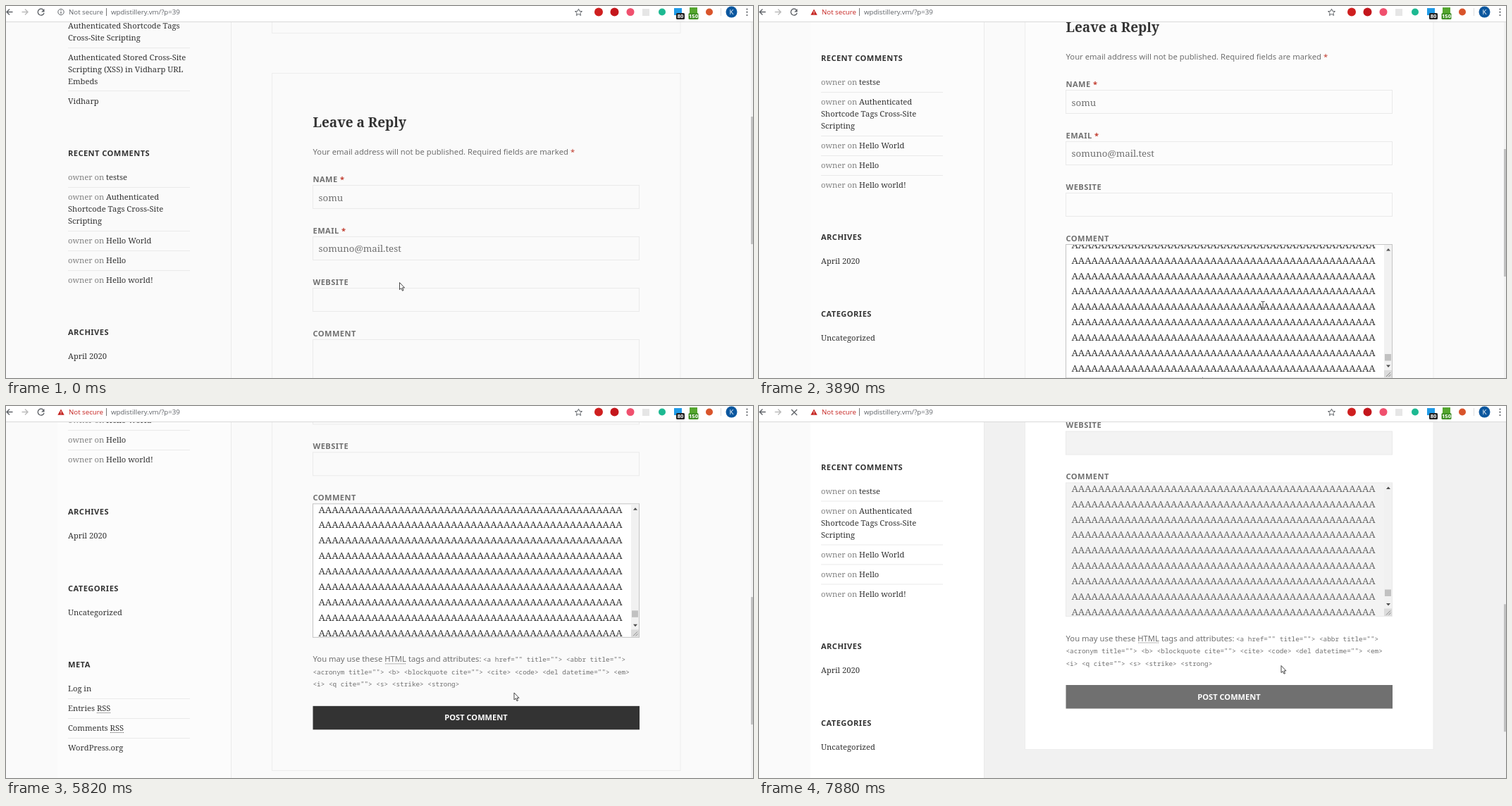
An HTML page that plays this animation: 1060 px wide and 528 px high, repeating every 8 s.

```html
<!DOCTYPE html>
<html lang="en">
<head>
<meta charset="utf-8">
<title>Comment form</title>
<style>
html, body { margin: 0; width: 100%; height: 100%; overflow: hidden; background: #fafafa; }
svg { display: block; }
text { white-space: pre; }
.serif { font: 11.2px "Noto Serif", serif; fill: #333; }
.head { font: bold 11.1px "Noto Sans", sans-serif; letter-spacing: .04em; fill: #333; }
.label { font: bold 11.1px "Noto Sans", sans-serif; letter-spacing: .04em; fill: #707070; }
.note { font: 11.27px "Noto Sans", sans-serif; fill: #707070; }
.title { font: bold 19px "Noto Serif", serif; fill: #333; }
.input { font: 13.3px "Noto Serif", serif; fill: #707070; }
.code { font: 9.37px "Noto Sans Mono", monospace; fill: #707070; }
.bar { font: 9.7px "Open Sans", sans-serif; fill: #5f6368; }
.badge { font: bold 7.5px "Open Sans", sans-serif; fill: #fff; text-anchor: middle; }
.dim { fill: #808080; }
.req { fill: #c0392b; }
.line { stroke: #eaeaea; fill: none; }
.box { stroke: #eaeaea; }
.card { stroke: #ededed; }
</style>
</head>
<body>
<svg id="stage" width="1060" height="528" viewBox="0 0 1060 528"></svg>
<script>
const ROW = 21.9, LOOP = 8000;
const text = (x, y, cls, s, more = '') => `<text x="${x}" y="${y}" class="${cls}" ${more}>${s}</text>`;
const rect = (x, y, w, h, more = '') => `<rect x="${x}" y="${y}" width="${w}" height="${h}" ${more}/>`;
const disc = (x, y, r, fill) => `<circle cx="${x}" cy="${y}" r="${r}" fill="${fill}"/>`;
const path = (d, more = '') => `<path d="${d}" ${more}/>`;
const esc = s => s.replace(/</g, '&lt;').replace(/>/g, '&gt;');
const req = ' <tspan class="req">*</tspan>';

function sidebar() {
  const by = '<tspan class="dim">owner on</tspan> ';
  const lines = [
    [32, 'Authenticated Shortcode Tags'], [49, 'Cross-Site Scripting'],
    [77, 'Authenticated Stored Cross-Site'], [94, 'Scripting (XSS) in Vidharp URL'], [111, 'Embeds'],
    [138.5, 'Vidharp'],
    [247, by + 'testse'], [275, by + 'Authenticated'], [292, 'Shortcode Tags Cross-Site'], [309, 'Scripting'],
    [337, by + 'Hello World'], [365, by + 'Hello'], [393, by + 'Hello world!'],
    [501, 'April 2020'], [610, 'Uncategorized'],
    [718, 'Log in'], [746, 'Entries RSS'], [774, 'Comments RSS'], [802, 'WordPress.org']
  ];
  const heads = [[213, 'RECENT COMMENTS'], [467, 'ARCHIVES'], [576, 'CATEGORIES'], [684, 'META']];
  const rules = [59.5, 120.5, 257.5, 319.5, 347.5, 375.5, 728.5, 756.5, 784.5];
  return lines.map(([y, s]) => text(88, y, 'serif', s)).join('')
    + heads.map(([y, s]) => text(88, y, 'head', s)).join('')
    + rules.map(y => path(`M88 ${y}H261`, 'class="line"')).join('')
    + path('M129 748.5H148M148 776.5H167', 'stroke="#555" stroke-dasharray="1 1"');
}

function comment() {
  let rows = '';
  for (let i = 1; i < 16; i++) rows += text(7.5, 184 - i * ROW, 'area', 'A'.repeat(46));
  rows += text(7.5, 184, 'area', 'A'.repeat(16) + esc("'></a>"));
  return rect(435.5, 473.5, 463, 189.5, 'id="area"')
    + `<svg x="436" y="474" width="462" height="188.5">
        <g id="rows" class="input">${rows}${rect(193, 170, 1, 18, 'fill="#333"')}</g>
        <g id="areaBar">${rect(451, 0, 11, 189, 'fill="#f1f1f1"')}${rect(451, 178, 11, 11, 'fill="#dcdcdc"')}
          ${rect(452, 0, 9, 9.5, 'id="areaThumb" fill="#c1c1c1"')}
          ${path('M454 8.5h6l-3-3.5zM454 170.5h6l-3 3.5z', 'fill="#505050"')}</g>
        ${path('M454 187l6-6M457.5 187l3-3', 'stroke="#888"')}
      </svg>`
    + rect(443, 482, 1, 18, 'id="caret" fill="#333"');
}

function main() {
  const field = y => rect(435.5, y, 463, 33, 'class="box"');
  const cards = [[-200, 238.5], [95.5, 756.5], [909, 98], [1064, 160]];
  return cards.map(([y, h]) => rect(377.5, y, 579.5, h, 'class="card"')).join('')
    + text(435.5, 172, 'title', 'Leave a Reply')
    + text(435.5, 211, 'note', 'Your email address will not be published. Required fields are marked' + req)
    + text(435.5, 250, 'label', 'NAME' + req) + field(254.5) + text(443.5, 276.5, 'input', 'somu')
    + text(435.5, 322.5, 'label', 'EMAIL' + req) + field(327.5) + text(443.5, 349, 'input', 'somuno@mail.test')
    + text(435.5, 395.5, 'label', 'WEBSITE') + field(400.5)
    + text(435.5, 468.5, 'label', 'COMMENT') + comment()
    + text(435.5, 698, 'note', 'You may use these HTML tags and attributes:')
    + path('M538 700.5H568', 'stroke="#707070" stroke-dasharray="1 1"')
    + text(677, 698, 'code', esc('<a href="" title=""> <abbr title="">'))
    + text(435.5, 715.5, 'code', esc('<acronym title=""> <b> <blockquote cite=""> <cite> <code> <del datetime=""> <em>'))
    + text(435.5, 733, 'code', esc('<i> <q cite=""> <s> <strike> <strong>'))
    + rect(435.5, 760.5, 463.5, 33.5, 'id="button"')
    + text(667, 781, 'head', 'POST COMMENT', 'text-anchor="middle" style="fill:#fff;letter-spacing:0"')
    + text(435.5, 951, 'label', 'PREVIOUS', 'style="fill:#8a8a8a"') + text(435.5, 973.5, 'title', 'testse');
}

function toolbar() {
  const thin = 'fill="none" stroke="#5f6368" stroke-width="1.4"';
  return rect(0, 0, 1060, 22, 'fill="#fff"') + path('M0 22.5H1060', 'stroke="#d9d9d9"')
    + path('M9.5 8.5H1M5 4.5L1 8.5L5 12.5', thin)
    + path('M22.5 8.5H31M27 4.5L31 8.5L27 12.5', 'fill="none" stroke="#bbb" stroke-width="1.4"')
    + `<g id="reload">${path('M53.2 5.7A4.5 4.5 0 1 0 54 10', thin)}${path('M54.5 4v4.5H50z', 'fill="#5f6368"')}</g>`
    + path('M46 5l8 8M54 5l-8 8', 'id="stop" ' + thin)
    + `<g id="info"><circle cx="78" cy="8.5" r="4.2" fill="none" stroke="#5f6368"/>${path('M78 8v3M78 5.8v1.1', 'stroke="#5f6368" stroke-width="1.2"')}</g>`
    + `<g id="warn">${path('M78 4.5L82.7 12.7H73.3z', 'fill="#c5221f"')}${path('M78 7.3v2.5M78 10.6v1', 'stroke="#fff"')}</g>`
    + text(89, 12.4, 'bar', 'Not secure', 'id="secure"')
    + path('M142.5 3V14', 'stroke="#777"')
    + text(149, 12.4, 'bar', 'wpdistillery.vm/?p=39')
    + path('M812.5 4l1.4 3.3 3.6.3-2.7 2.3.8 3.5-3.1-1.9-3.1 1.9.8-3.5-2.7-2.3 3.6-.3z', 'fill="none" stroke="#5f6368"')
    + disc(841, 8.5, 6, '#cf1f1f') + disc(863.5, 8.5, 6, '#c4161c') + disc(886, 8.5, 5.5, '#f0506e')
    + rect(903, 4, 10, 10, 'fill="#e6e6e6"') + disc(931, 8.5, 5, '#1db992')
    + rect(948, 3, 11, 10, 'fill="#1f9be8"') + rect(951, 10, 12, 9, 'rx="1.5" fill="#222"') + text(957, 17.3, 'badge', '80')
    + rect(970, 2, 11, 10, 'fill="#55a630"') + rect(968.5, 10, 14, 9, 'rx="1.5" fill="#3f8f25"') + text(975.5, 17.3, 'badge', '150')
    + disc(998, 8.5, 5, '#d9542b')
    + path('M1014.5 3V14', 'stroke="#ddd"')
    + disc(1029.5, 8.5, 8, '#0b579f') + text(1029.5, 12, 'bar', 'K', 'text-anchor="middle" style="fill:#fff"')
    + disc(1051.5, 4.5, 1.1, '#5f6368') + disc(1051.5, 8.7, 1.1, '#5f6368') + disc(1051.5, 13, 1.1, '#5f6368');
}

const stage = document.getElementById('stage');
stage.innerHTML = rect(0, 0, 1060, 528, 'id="back"') + rect(0, 0, 73, 528, 'fill="#fafafa"')
  + rect(73, 22, 246.5, 506, 'id="sideBack"')
  + path('M319.5 22V528', 'class="line"')
  + `<g id="side">${sidebar()}</g><g id="main">${main()}</g>`
  + rect(1057, 22, 3, 506, 'fill="#f1f1f1"') + rect(1057, 157, 3, 181, 'id="thumb" fill="#c1c1c1"')
  + toolbar()
  + path('M0 0V10L2.3 8L4 11.7L5.5 11L4 7.4H7z', 'id="arrow" fill="#fff" stroke="#333" stroke-width=".9"')
  + path('M-2.5 -4.5H-.7L0 -4L.7 -4.5H2.5M0 -4V4M-2.5 4.5H-.7L0 4L.7 4.5H2.5', 'id="beam" fill="none" stroke="#444"');

const $ = id => document.getElementById(id);
const set = (id, name, value) => $(id).setAttribute(name, value);
const show = (id, on) => set(id, 'visibility', on ? 'visible' : 'hidden');
const move = (id, x, y) => set(id, 'transform', `translate(${x} ${y})`);

// The picture is refreshed in runs: first time, last time, number of steps.
const ticks = [[0, 0, 1], [150, 660, 5], [970, 970, 1], [1530, 1530, 1], [1960, 1960, 1], [2390, 3020, 6],
  [3220, 3350, 2], [3500, 3890, 4], [4040, 4430, 4], [4580, 4580, 1], [4850, 5010, 2], [5280, 5280, 1],
  [5400, 6250, 6], [6390, 6510, 2], [6640, 7390, 6], [7540, 7880, 3]]
  .flatMap(([a, b, n]) => Array.from({ length: n }, (_, i) => n > 1 ? a + (b - a) * i / (n - 1) : a));

// Each key is a time followed by the values reached then.
const scrollKeys = [[60, 0], [660, 135], [5280, 135], [6250, 556], [7390, 556], [7880, 364.5]];
const rowKeys = [[3760, 0], [3890, 17.9], [4430, 94.6], [5280, 94.6], [5400, 91]];
const mouseKeys = [[60, 558.5, 392.5], [660, 548, 362], [2516, 548, 362], [3020, 635.5, 386], [3890, 715, 424],
  [5280, 721, 407], [6250, 721, 407], [6390, 712, 280], [6510, 693, 241], [6790, 690, 222], [7090, 690, 222], [7880, 741, 368.5]];

function at(keys, t) {
  const i = keys.findIndex(k => k[0] > t);
  if (i === 0) return keys[0].slice(1);
  if (i < 0) return keys[keys.length - 1].slice(1);
  const a = keys[i - 1], b = keys[i], p = (t - a[0]) / (b[0] - a[0]);
  return a.slice(1).map((v, j) => v + (b[j + 1] - v) * p);
}

function draw(now) {
  const clock = now % LOOP;
  const t = ticks.filter(k => k <= clock).pop();
  const [scroll] = at(scrollKeys, t), [shift] = at(rowKeys, t), [mx, my] = at(mouseKeys, t);
  const pasted = t >= 2510, clicked = t >= 6930, fresh = t >= 7500;
  const focus = t >= 970 && !clicked;
  const pale = pasted && t < 5400;

  move('main', 0, -scroll);
  move('side', 0, fresh ? 242 - scroll : -Math.min(scroll, 313));
  move('thumb', 0, scroll * .341);
  move('rows', 0, shift);
  move('areaThumb', 0, 156 - shift * .055);

  set('back', 'fill', fresh ? '#f1f1f1' : '#fafafa');
  set('sideBack', 'fill', fresh ? '#fff' : pasted ? '#fcfcfc' : '#fafafa');
  const cardFill = fresh ? '#fff' : pale ? '#fcfcfc' : '#fafafa';
  stage.querySelectorAll('.card').forEach(c => c.style.fill = cardFill);
  stage.querySelectorAll('.box').forEach(b => b.style.fill = fresh ? '#f3f3f3' : cardFill);
  set('area', 'fill', focus ? '#fff' : clicked ? '#f3f3f3' : cardFill);
  set('area', 'stroke', focus ? '#c4c4c4' : '#eaeaea');
  stage.querySelectorAll('.area').forEach(a => a.style.fill = focus ? '#333' : '#666');
  set('button', 'fill', t >= 6640 ? '#707070' : '#333');

  show('rows', pasted);
  show('areaBar', pasted);
  show('caret', t >= 970 && t < 1530 || t >= 1960 && t < 2390);
  show('info', !pasted);
  show('warn', pasted);
  $('secure').style.fill = pasted ? '#c5221f' : '#5f6368';
  show('reload', !clicked);
  show('stop', clicked);

  const typing = my > 473 - scroll && my < 663 - scroll;
  show('beam', typing);
  show('arrow', !typing);
  move('beam', mx, my);
  move('arrow', mx, my);
}

const start = performance.now();
function loop() {
  draw(performance.now() - start);
  requestAnimationFrame(loop);
}
draw(0);
loop();
</script>
</body>
</html>
```
